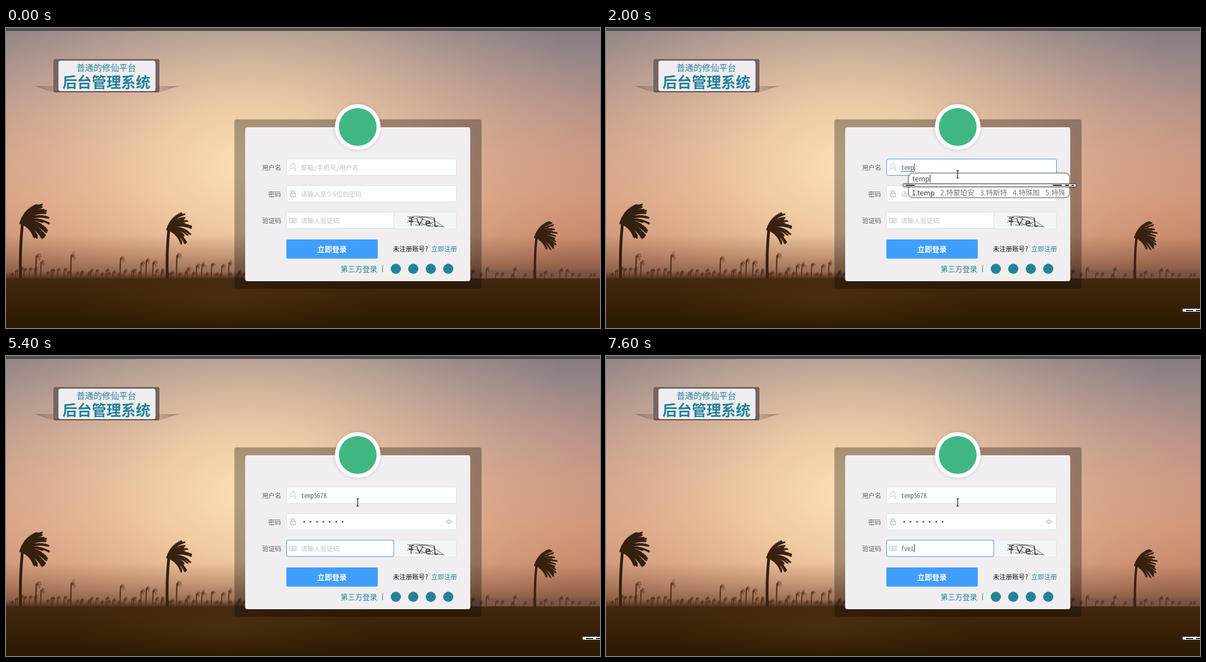
These frames come from a looping animation (1053x532 px, 8000 ms). An HTML page with a canvas:

```html
<!DOCTYPE html>
<html lang="zh-CN">
<head>
<meta charset="utf-8">
<title>后台管理系统</title>
<style>
html, body { margin: 0; width: 100%; height: 100%; overflow: hidden; }
body { background: #2e1c04; font: 11.33px "Noto Sans Mono CJK SC", "Noto Sans CJK SC", "Noto Sans CJK", sans-serif; }
#stage { position: relative; width: 1053px; height: 532px; overflow: hidden; }
#stage > * { position: absolute; box-sizing: border-box; }
canvas, #art { left: 0; top: 0; }
.text { white-space: pre; line-height: 20px; height: 20px; color: #606266; }
.teal { color: #24819a; }
.banner { left: 84px; top: 55px; width: 188px; height: 59px; background: #766560; border-radius: 4px; border-bottom: 2px solid #5c4c48; }
.plate { left: 93px; top: 58px; width: 172px; height: 54px; background: #f0eef0; border-radius: 4px; }
.panel { left: 405px; top: 162px; width: 438px; height: 300px; background: rgba(0, 0, 0, .3); border-radius: 4px; }
.card { left: 424px; top: 176px; width: 399px; height: 273px; background: #f0eef0; border-radius: 4px; }
.avatar { left: 583px; top: 135px; width: 81px; height: 81px; border-radius: 50%; background: #fff; box-shadow: 0 0 7px rgba(0, 0, 0, .14); }
.avatar::after { content: ""; position: absolute; inset: 7px; border-radius: 50%; background: #41b883; }
.field { left: 497px; width: 302px; height: 30px; background: #fdfeff; border: 1px solid #dcdfe6; border-radius: 3px; display: flex; align-items: center; padding-left: 25px; }
.field .hint { position: absolute; left: 25px; color: #bfc2ca; white-space: pre; }
.typed { color: #606266; white-space: pre; height: 14px; line-height: 14px; }
.typed.composing { box-shadow: 0 1px #606266; }
.field.secret .typed { display: flex; }
.dot { width: 11.33px; height: 14px; background: radial-gradient(circle at 5.5px 7px, #505257 1.3px, transparent 1.8px); }
.caret { width: 1px; height: 14px; margin-right: -1px; background: #333; }
.captcha { left: 687px; top: 326px; width: 112px; height: 31px; background: #f3f6f9; border: 1px solid #dfe3e8; border-radius: 3px; }
.button { left: 497px; top: 375px; width: 162px; height: 34px; line-height: 34px; text-align: center; background: #409eff; border-radius: 3px; color: #fff; font-size: 13px; font-weight: bold; }
.social { top: 418px; width: 18px; height: 18px; border-radius: 50%; background: #24819a; }
#popup { left: 536px; height: 44px; background: #fff; border: 1.5px solid #777; border-radius: 8px; padding: 24px 7px 0 5px; box-shadow: 0 0 3px rgba(0, 0, 0, .45); font: 12.5px/20px "Noto Sans CJK SC", "Noto Sans CJK", sans-serif; color: #777; }
#words { display: flex; gap: 10px; white-space: nowrap; }
#words :first-child { color: #333; }
#head { position: absolute; left: 6px; top: 1px; height: 16px; line-height: 16px; display: flex; align-items: center; color: #444; }
.rail { position: absolute; left: -11px; right: -13px; top: 18px; height: 6px; box-sizing: border-box; background: #fff; border: 1px solid #555; border-radius: 4px; box-shadow: 0 0 3px rgba(0, 0, 0, .6); }
.rail i { position: absolute; top: 1px; height: 2px; background: #222; }
#tray { left: 1021px; top: 497px; width: 60px; height: 7px; background: #fff; border: 1px solid #333; border-radius: 4px; }
#tray i { position: absolute; top: 1.5px; height: 2px; background: #222; }
</style>
</head>
<body>
<div id="stage">
  <canvas id="scene" width="1053" height="532"></canvas>
  <div class="banner"></div>
  <div class="plate"></div>
  <div class="text teal" style="left:125px;top:59px;font-size:15.1px">普通的修仙平台</div>
  <div class="text teal" style="left:100px;top:80px;height:30px;line-height:30px;font-size:26px;font-weight:bold">后台管理系统</div>
  <div class="panel"></div>
  <div class="card"></div>
  <div class="avatar"></div>

  <div class="text" style="left:454px;top:237px">用户名</div>
  <div class="text" style="left:465px;top:284px">密码</div>
  <div class="text" style="left:454px;top:331px">验证码</div>
  <div class="field" style="top:232px"><span class="hint">邮箱/手机号/用户名</span><span class="typed"></span><span class="caret"></span></div>
  <div class="field secret" style="top:279px"><span class="hint">请输入至少6位的密码</span><span class="typed"></span><span class="caret"></span></div>
  <div class="captcha"></div>
  <div class="field" style="top:326px;width:191px"><span class="hint">请输入验证码</span><span class="typed"></span><span class="caret"></span></div>

  <div class="button">立即登录</div>
  <div class="text" style="left:686px;top:381px;color:#111">未注册账号?</div>
  <div class="text teal" style="left:754px;top:381px">立即注册</div>
  <div class="text teal" style="left:593px;top:417px;font-size:13px">第三方登录</div>
  <div style="left:667px;top:421px;width:1px;height:12px;background:#24819a"></div>
  <div class="social" style="left:682px"></div>
  <div class="social" style="left:713px"></div>
  <div class="social" style="left:744px"></div>
  <div class="social" style="left:775px"></div>

  <svg id="art" width="1053" height="532" fill="none" stroke="#c0c4cc" stroke-width="1.1">
    <circle cx="508.5" cy="244.5" r="4.2"/>
    <path d="M502.5 253q.5-4 4-5M511 248.500q2 1 2.500 2.500M511.500 252.500h4"/>
    <path d="M504 293.500h9v6h-9zM506 293v-2.500a2.500 2.500 0 0 1 5 0v2.500M508.500 295.500v2" stroke="#a9adb6"/>
    <path d="M502.500 337.500h12v2q-2 1.500 0 3v2.500h-12v-2.500q2-1.500 0-3zM505 339.500h7M506 341.500h6M505 343.500h7"/>
    <g id="eye"><path d="M779.500 294q5.500-7 11 0q-5.500 7-11 0z"/><circle cx="785" cy="294" r="1.8"/></g>
    <g stroke="#222">
      <path d="M714 337.500l9-1.500M719 336l-1 15M715 343h7M728 338l5 11l6-12M744 346h8q-1-5-5-4q-5 3-1 8q3 2 7-1M759 336l2 16l5-1" stroke-width="1.3"/>
      <path d="M711 335q30-4 46 5q10 7 20 13M711 345q18-13 45-9q10 6-3 10q-14 5-28 3M712 341q24 3 38 11q14-2 25 0M732 335l30 16" stroke-width=".7"/>
    </g>
  </svg>

  <div id="tray"><i style="left:6px;width:13px"></i><i style="left:24px;width:12px"></i></div>
  <div id="popup">
    <div id="words"></div>
    <div id="head"><span></span><span class="caret"></span></div>
    <div class="rail"><i style="left:4px;width:16px"></i><i style="right:25px;width:16px"></i><i style="right:12px;width:7px"></i><i style="right:4px;width:4px"></i></div>
  </div>
  <svg id="cursor" width="20" height="24" style="left:0;top:0;overflow:visible">
    <path id="arrow" d="M0 0v15l3.500-3.200l2.500 5.500l2.300-1l-2.500-5.300h4.700z" fill="#111" stroke="#fff"/>
    <path id="beam" d="M-2.500-6.500h2l.5.500l.5-.5h2M0-6v12M-2.500 6.500h2l.5-.5l.5.500h2" fill="none" stroke="#111" stroke-width="1.1"/>
  </svg>
</div>

<script>
const $ = id => document.getElementById(id);

// Scenery
const g = $('scene').getContext('2d');
let seed = 11;
const rnd = () => (seed = seed * 16807 % 2147483647) / 2147483647;

function ramp(grad, ...colors) {
  colors.forEach((c, i) => grad.addColorStop(i / (colors.length - 1), c));
  return grad;
}

function box(fill, x, y, w, h) {
  g.fillStyle = fill;
  g.fillRect(x, y, w, h);
}

function glow(x, y, r, squash, ...colors) {
  g.save();
  g.translate(x, y);
  g.scale(1, squash);
  box(ramp(g.createRadialGradient(0, 0, 0, 0, 0, r), ...colors), -r, -r, 2 * r, 2 * r);
  g.restore();
}

function poly(fill, ...points) {
  g.fillStyle = fill;
  g.beginPath();
  for (let i = 0; i < points.length; i += 2) g.lineTo(points[i], points[i + 1]);
  g.fill();
}

// A palm bent by wind: trunk foot (x, base), height h, fronds reaching right by r
function palm(x, base, h, r, color, thick) {
  const top = base - h, fronds = r > 20 ? 26 : 5;
  g.strokeStyle = color;
  g.lineCap = 'round';
  g.lineWidth = thick;
  g.beginPath();
  g.moveTo(x, base);
  g.quadraticCurveTo(x - r * .04, base - h * .5, x + r * .06, top);
  g.stroke();
  g.lineWidth = Math.max(1, r / 14);
  for (let i = 0; i < fronds; i++) {
    const a = -.85 + 1.65 * i / (fronds - 1), reach = r * (.65 + .35 * rnd());
    g.beginPath();
    g.moveTo(x, top);
    g.quadraticCurveTo(x + reach * .55 * Math.cos(a - .45), top + reach * .55 * Math.sin(a - .45),
      x + reach * Math.cos(a), top + reach * Math.sin(a));
    g.stroke();
  }
}

function grove(from, to, count, low, high, color) {
  for (let i = 0; i < count; i++) {
    const h = low + (high - low) * rnd() ** 2.5;
    palm(from + (to - from) * (i + rnd()) / count, 447, h, 4 + h * .15, color, 1 + h / 30);
  }
}

function paintScene() {
  box(ramp(g.createLinearGradient(0, 5, 0, 445),
    '#857b82', '#a18a88', '#bb9488', '#cb9983', '#d2967a', '#c88a6d', '#94644f'), 0, 0, 1053, 450);
  glow(430, 245, 640, .72, 'rgba(255,229,180,.95)', 'rgba(250,219,175,.76)',
    'rgba(242,207,170,.5)', 'rgba(232,196,164,.24)', 'rgba(226,186,158,0)');
  box(ramp(g.createLinearGradient(0, 365, 0, 445), 'rgba(160,100,70,0)', 'rgba(145,90,65,.35)', 'rgba(112,70,50,.75)'), 0, 365, 1053, 80);
  box('rgba(105,80,80,.3)', 800, 429, 253, 16);
  box(ramp(g.createLinearGradient(0, 432, 0, 445), 'rgba(65,38,20,0)', 'rgba(65,38,20,.8)'), 0, 432, 420, 13);
  grove(6, 425, 56, 10, 46, '#54321d');
  grove(825, 1050, 18, 8, 20, '#55341f');
  palm(26, 447, 101, 52, '#33200f', 5);
  palm(286, 447, 90, 43, '#38210f', 5);
  palm(938, 447, 76, 40, '#38210f', 4);
  box(ramp(g.createLinearGradient(0, 443, 0, 532), '#432810', '#392107', '#2b1903'), 0, 444, 1053, 88);
  g.save();
  g.beginPath();
  g.rect(0, 445, 1053, 87);
  g.clip();
  glow(385, 480, 270, .22, 'rgba(110,72,32,.3)', 'rgba(100,65,25,0)');
  g.restore();
  for (const [tip, edge, inner] of [[50, 84, 92], [307, 272, 264]]) {
    const shade = ramp(g.createLinearGradient(tip, 0, edge, 0), 'rgba(90,70,66,.45)', 'rgba(90,70,66,.2)');
    poly(shade, tip, 103, inner, 103, inner, 114, edge, 114);
  }
  box('#555', 0, 0, 1053, 4);
  box('#3b3838', 0, 4, 1053, 1);
}

// Timelines: [start ms, value]
const NAME = 'temp5678', CODE = 'fvel';
const typing = [
  [[0, 0], [1600, 1], [1700, 2], [1800, 3], [1900, 4], [2800, 5], [2900, 6], [3000, 7], [3400, 8]],
  [[0, 0], [3900, 1], [4100, 3], [4200, 4], [4500, 6], [4600, 7]],
  [[0, 0], [5900, 1], [6300, 2], [6600, 3], [7000, 4]]
];
const choices = [
  [0, ''], [1600, '他 她 它 特 图'], [1700, '特 特别 特殊 特点 特'],
  [1800, 'tem 特蒙 特么 特命 特'], [2000, 'temp 特蒙珀安 特斯特 特殊图 特殊'], [2400, ''],
  [5900, '发 放 非 父 法'], [6300, 'fv 服务 服务器 访问 法务'],
  [6600, 'fve 服务 访问 法务 飞舞'], [7500, 'fvel 服务二类 服务类 法务类 非类'], [7600, '']
];
const focusAt = [700, 3600, 4900, Infinity];
const at = (list, t) => list.filter(e => e[0] <= t).pop()[1];
const within = (t, a, b) => t >= a && t < b;
const clamp = v => Math.max(0, Math.min(1, v));
const show = (el, on) => { el.style.visibility = on ? 'visible' : 'hidden'; };

const fields = [...document.querySelectorAll('.field')].map(el => ({
  el, hint: el.querySelector('.hint'), typed: el.querySelector('.typed'), caret: el.querySelector('.caret')
}));

function borderColor(t, i) {
  const fade = start => clamp((t - start + 100) / 200);
  const k = fade(focusAt[i]) - fade(focusAt[i + 1]);
  const mix = (a, b) => Math.round(a + (b - a) * k);
  return `rgb(${mix(220, 64)},${mix(223, 158)},${mix(230, 255)})`;
}

function drawFields(t, composing) {
  const blink = within(t, 1100, 1600) || within(t, 5400, 5900);
  fields.forEach((f, i) => {
    const n = at(typing[i], t), active = within(t, focusAt[i], focusAt[i + 1]);
    f.el.style.borderColor = borderColor(t, i);
    show(f.hint, !n);
    if (i === 1) f.typed.innerHTML = '<span class="dot"></span>'.repeat(n);
    else f.typed.textContent = (i ? CODE : NAME).slice(0, n);
    f.typed.classList.toggle('composing', active && composing);
    show(f.caret, active && !blink);
  });
}

function drawPopup(t, words) {
  const popup = $('popup'), second = t > 5000;
  popup.style.display = words ? 'block' : 'none';
  popup.style.top = (second ? 351 : 257) + 'px';
  if (!words) return;
  $('words').innerHTML = words.split(' ').map((w, i) => `<span>${i + 1}.${w}</span>`).join('');
  $('head').firstChild.textContent = fields[second ? 2 : 0].typed.textContent;
}

function drawCursor(t) {
  const k = 1 - (1 - clamp((t - 100) / 500)) ** 2;
  const x = 1042 - 419 * k, y = 149 + 110 * k;
  const overField = x < 799 && y > 232;
  show($('cursor'), t >= 100);
  $('cursor').style.transform = `translate(${x + .5}px,${y + .5}px)`;
  $('arrow').style.display = overField ? 'none' : '';
  $('beam').style.display = overField ? '' : 'none';
}

function frame(now) {
  const t = Math.floor(now % 8000 / 100) * 100; // the picture changes ten times a second
  const words = at(choices, t);
  drawFields(t, !!words);
  drawPopup(t, words);
  drawCursor(t);
  show($('eye'), t >= 3700);
  show($('tray'), t >= 700 && !within(t, 3600, 4900));
  requestAnimationFrame(frame);
}

paintScene();
requestAnimationFrame(frame);
</script>
</body>
</html>
```
